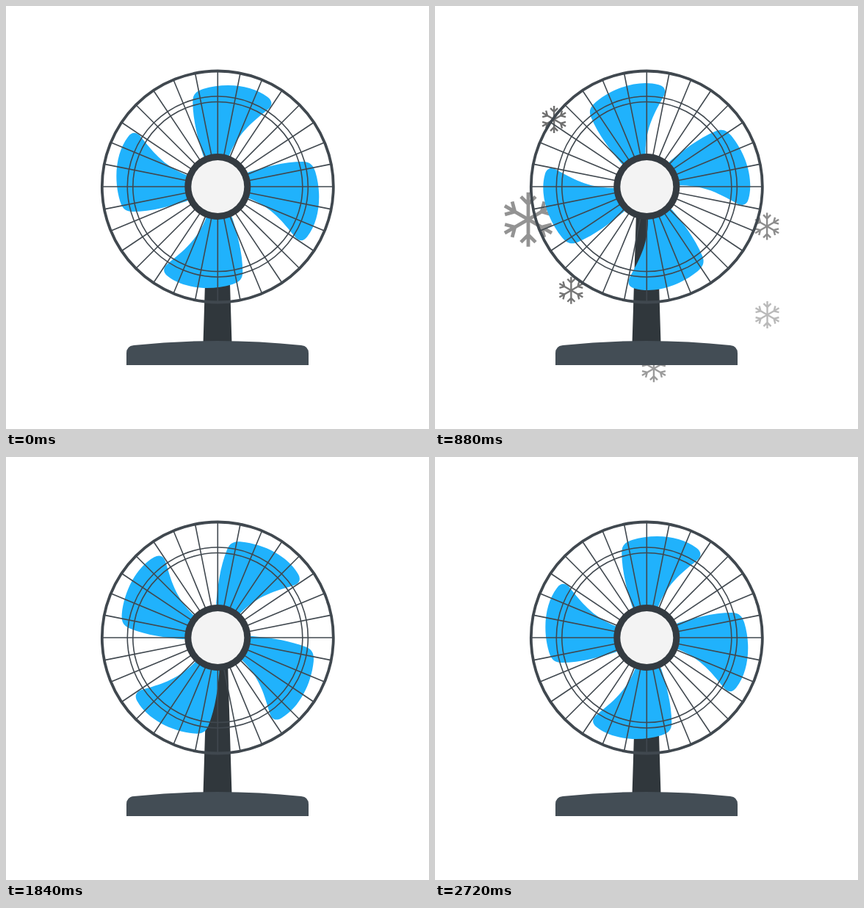
Animation of 576x576 px, one loop 2760 ms. Source, as an HTML page:

```html
<!DOCTYPE html>
<html lang="en">
<head>
<meta charset="utf-8">
<title>Desk fan</title>
<style>
  html, body { margin: 0; height: 100%; overflow: hidden; background: #fff; }
  svg { display: block; width: 100%; height: 100%; }
</style>
</head>
<body>
<svg viewBox="0 0 576 576">
  <defs>
    <path id="blade" d="M-10-20L-20-43C-26-62-34-90-34-116C-34-126-29-130-20-133C10-142 46-139 68-122C76-116 74-109 67-104C50-90 29-75 16-43L10-20Z"/>
    <path id="arm" d="M0 0V-18.5M-5-15.5L0-10.5L5-15.5"/>
    <g id="flake"></g>
  </defs>
  <g id="snow" transform="translate(288 246)" fill="none" stroke="#6e6e6e" stroke-width="2.4"></g>
  <path fill="#30373c" d="M274 280H302L307.5 460H268.5Z"/>
  <path fill="#434d55" d="M164 489V473Q164 463 174 462Q288 450 402 462Q412 463 412 473V489Z"/>
  <g transform="translate(288.3 246)">
    <g id="blades" fill="#20b2fc"></g>
    <g fill="none" stroke="#40484f" stroke-width="1.6">
      <g id="spokes"></g>
      <circle r="123"/>
      <circle r="115.5"/>
      <circle r="157.5" stroke-width="3.8"/>
    </g>
    <circle r="45" fill="#343b41"/>
    <circle r="36" fill="#f3f3f3"/>
  </g>
</svg>
<script>
const LOOP = 2760, STEP = 40, SPIN = 2700, DRIFT = 0.065;
const $ = id => document.getElementById(id);
const ring = (count, shape) => Array.from({ length: count },
  (_, i) => `<g transform="rotate(${i * 360 / count})">${shape}</g>`).join('');

$('blades').innerHTML = ring(4, '<use href="#blade"/>');
$('spokes').innerHTML = ring(32, '<path d="M0-44V-157"/>');
$('flake').innerHTML = ring(6, '<use href="#arm"/>');

// Each flake drifts straight away from the hub
function makeFlake(angle, radius, birth, life, scale = 1) {
  const node = document.createElementNS('http://www.w3.org/2000/svg', 'use');
  node.setAttribute('href', '#flake');
  $('snow').append(node);
  return t => {
    const age = t - birth, reach = radius + DRIFT * age;
    const x = reach * Math.cos(angle * Math.PI / 180);
    const y = reach * Math.sin(angle * Math.PI / 180);
    const fade = Math.min(1, age / 190, (life - age) / 190);
    node.setAttribute('opacity', Math.max(0, fade));
    node.setAttribute('transform', `translate(${x} ${y}) scale(${scale})`);
  };
}

const flakes = [
  makeFlake(126, 133, 240, 820),
  makeFlake(46.7, 208, 390, 580),
  makeFlake(18.2, 163, 730, 900),
  makeFlake(216, 140, 640, 800),
  makeFlake(164.5, 158, 740, 500, 2),
  makeFlake(87.7, 231, 620, 390)
];

// Equals cubic-bezier(.4, 0, .6, 1)
function ease(x) {
  let low = 0, high = 1, s;
  for (let i = 0; i < 30; i++) {
    s = (low + high) / 2;
    if (1.2 * s - 0.6 * s * s + 0.4 * s ** 3 < x) low = s;
    else high = s;
  }
  return s * s * (3 - 2 * s);
}

function draw(now) {
  const t = Math.floor(now % LOOP / STEP) * STEP;
  const angle = SPIN * ease(t / (LOOP - STEP));
  $('blades').setAttribute('transform', `rotate(${angle})`);
  flakes.forEach(place => place(t));
}

const begin = performance.now();
function tick() {
  draw(performance.now() - begin);
  requestAnimationFrame(tick);
}
tick();
</script>
</body>
</html>
```
